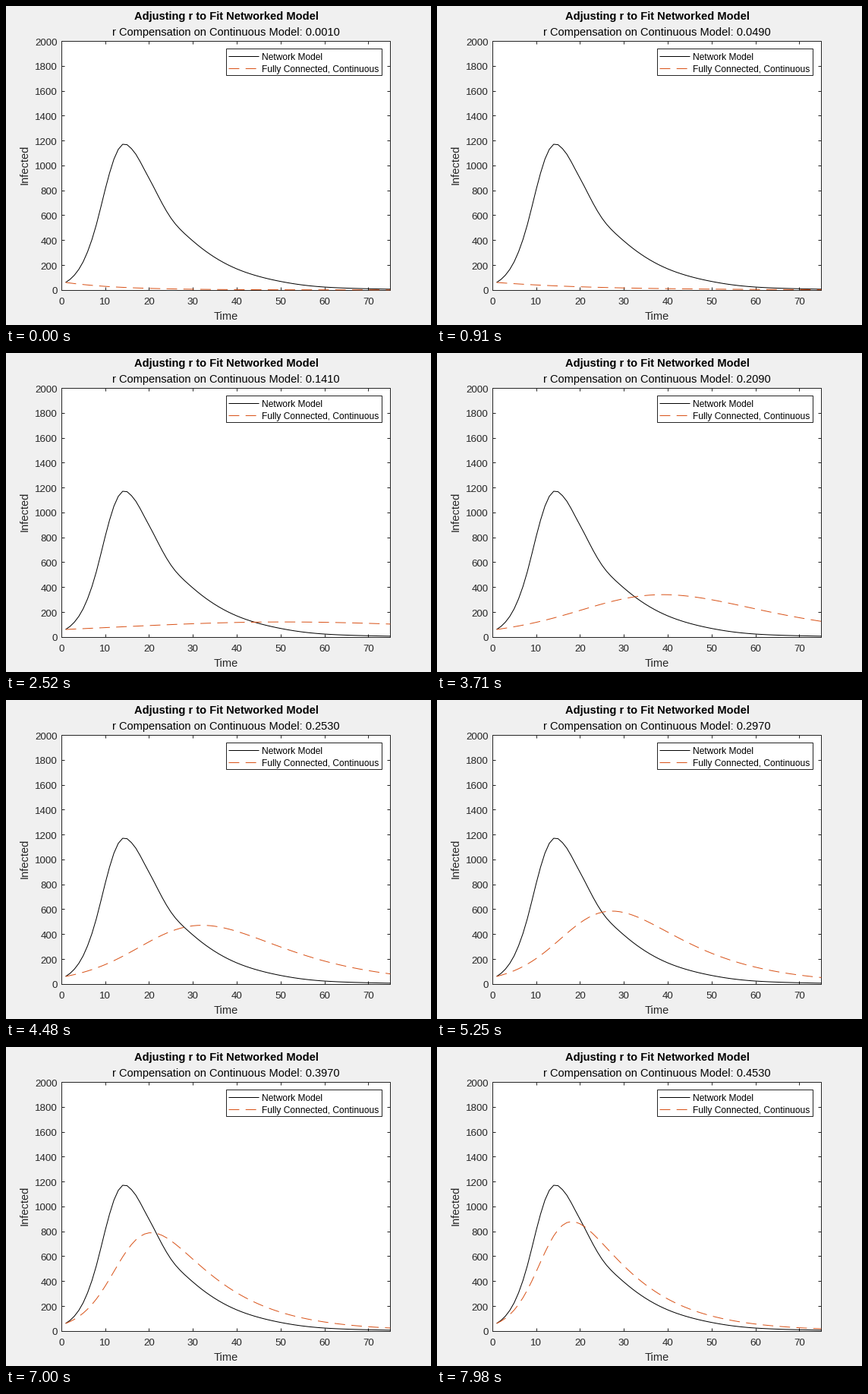
A matplotlib script for the animation above (8000 ms loop, 560 by 420 pixels).

```python
import numpy as np
import matplotlib.pyplot as plt
from matplotlib.animation import FuncAnimation
from matplotlib.patches import Rectangle

W, H, DPI = 560, 420, 100
PX = 72 / DPI                      # points per pixel
LOOP, TICK = 8000, 20              # ms
HOLD, STEP = 140, 70               # first pause, then time per value

LEFT, RIGHT, TOP, BOTTOM = 72.8, 506.4, 46, 373.8
T_MAX, I_MAX = 75, 2000
GRAY, ORANGE = "#262626", (0.85, 0.325, 0.098)
DASH = (0, (10, 6))

plt.rcParams["font.family"] = "Liberation Sans"
plt.rcParams["lines.scale_dashes"] = False


def px_x(t):
    return LEFT + (RIGHT - LEFT) * np.asarray(t) / T_MAX


def px_y(v):
    return BOTTOM - (BOTTOM - TOP) * np.asarray(v) / I_MAX


def epidemic(r, pop=2000, start=60, sub=4):
    """Infected counts at t = 1..T_MAX for every rate in r (SIR, RK4)."""
    beta, gamma = 0.8 * r, 1 / 12

    def slope(y):
        new = beta * y[0] * y[1] / pop
        return np.array([-new, new - gamma * y[1]])

    y = np.array([np.full_like(r, pop - start), np.full_like(r, start)])
    out, h = [y[1]], 1 / sub
    for _ in range(T_MAX - 1):
        for _ in range(sub):
            a = slope(y)
            b = slope(y + h / 2 * a)
            c = slope(y + h / 2 * b)
            d = slope(y + h * c)
            y = y + h / 6 * (a + 2 * b + 2 * c + d)
        out.append(y[1])
    return np.array(out).T


def smooth_log(t, keys):
    """Cubic Hermite curve through the keys, in log space."""
    x, v = np.array(keys, float).T
    p = np.log(v)
    m = np.gradient(p, x)
    k = np.clip(np.searchsorted(x, t, side="right") - 1, 0, len(x) - 2)
    h = x[k + 1] - x[k]
    u = (t - x[k]) / h
    rise = u * u * (3 - 2 * u)
    bend = u * (1 - u) ** 2 * m[k] - u * u * (1 - u) * m[k + 1]
    return np.exp(p[k] + (p[k + 1] - p[k]) * rise + h * bend)


def value_index(ms):
    return max(0, (ms - HOLD) // STEP + 1)


days = np.arange(1, T_MAX + 1)
rates = 0.001 + 0.004 * np.arange(value_index(LOOP - 1) + 1)
curves = epidemic(rates)
network = smooth_log(days, [
    (1, 60), (4, 165), (7, 405), (10, 805), (12, 1050), (14, 1170), (16, 1135),
    (20, 897), (26, 530), (30, 393), (40, 169), (50, 68), (60, 23), (75, 6)])

fig = plt.figure(figsize=(W / DPI, H / DPI), dpi=DPI, facecolor="#f0f0f0")
ax = fig.add_axes([0, 0, 1, 1])
ax.set(xlim=(0, W), ylim=(H, 0))
ax.axis("off")


def box(x0, y0, x1, y1, z):
    ax.add_patch(Rectangle((x0, y0), x1 - x0, y1 - y0, facecolor="white",
                           edgecolor=GRAY, linewidth=PX, zorder=z, snap=True))


def line(x, y, color, z, dash="-", **kw):
    return ax.plot(x, y, color=color, lw=PX, ls=dash, zorder=z,
                   dash_capstyle="butt", solid_capstyle="butt", **kw)[0]


def text(x, y, s, size, color="black", ha="center", va="baseline", **kw):
    return ax.text(x, y, s, fontsize=size * PX, color=color, ha=ha, va=va,
                   zorder=6, **kw)


# Plot frame with inward ticks on all four sides
box(LEFT, TOP, RIGHT, BOTTOM, 1)
for t in range(0, T_MAX, 10):
    x = px_x(t)
    for y, d in ((BOTTOM, -4.3), (TOP, 4.3)):
        line([x, x], [y, y + d], GRAY, 2, snap=True)
    text(x, 393, str(t), 13.33, GRAY)
for v in range(0, I_MAX + 1, 200):
    y = px_y(v)
    for x, d in ((LEFT, 4.3), (RIGHT, -4.3)):
        line([x, x + d], [y, y], GRAY, 2, snap=True)
    text(67.5, y + 5.5, str(v), 13.33, GRAY, ha="right")

text(290, 18, "Adjusting r to Fit Networked Model", 14.67, weight="bold")
subtitle = text(290, 39, "", 14.67)
text(290, 413, "Time", 14.67, GRAY)
text(32, 208.5, "Infected", 14.67, GRAY, "right", "center", rotation=90)

line(px_x(days), px_y(network), "black", 3)
fit = line(px_x(days), px_y(curves[0]), ORANGE, 3, DASH)

# Legend
box(290, 56, 495, 91, 4)
for y, color, dash, name in (
        (66, "black", "-", "Network Model"),
        (82, ORANGE, DASH, "Fully Connected, Continuous")):
    line([293, 333], [y, y], color, 5, dash, snap=True)
    text(337, y + 5, name, 12, ha="left")


def update(i):
    k = value_index(i * TICK + TICK // 2)
    fit.set_ydata(px_y(curves[k]))
    subtitle.set_text(f"r Compensation on Continuous Model: {rates[k]:.4f}")
    return fit, subtitle


anim = FuncAnimation(fig, update, frames=LOOP // TICK, interval=TICK,
                     repeat=True, repeat_delay=0, blit=False)
plt.show()
```
